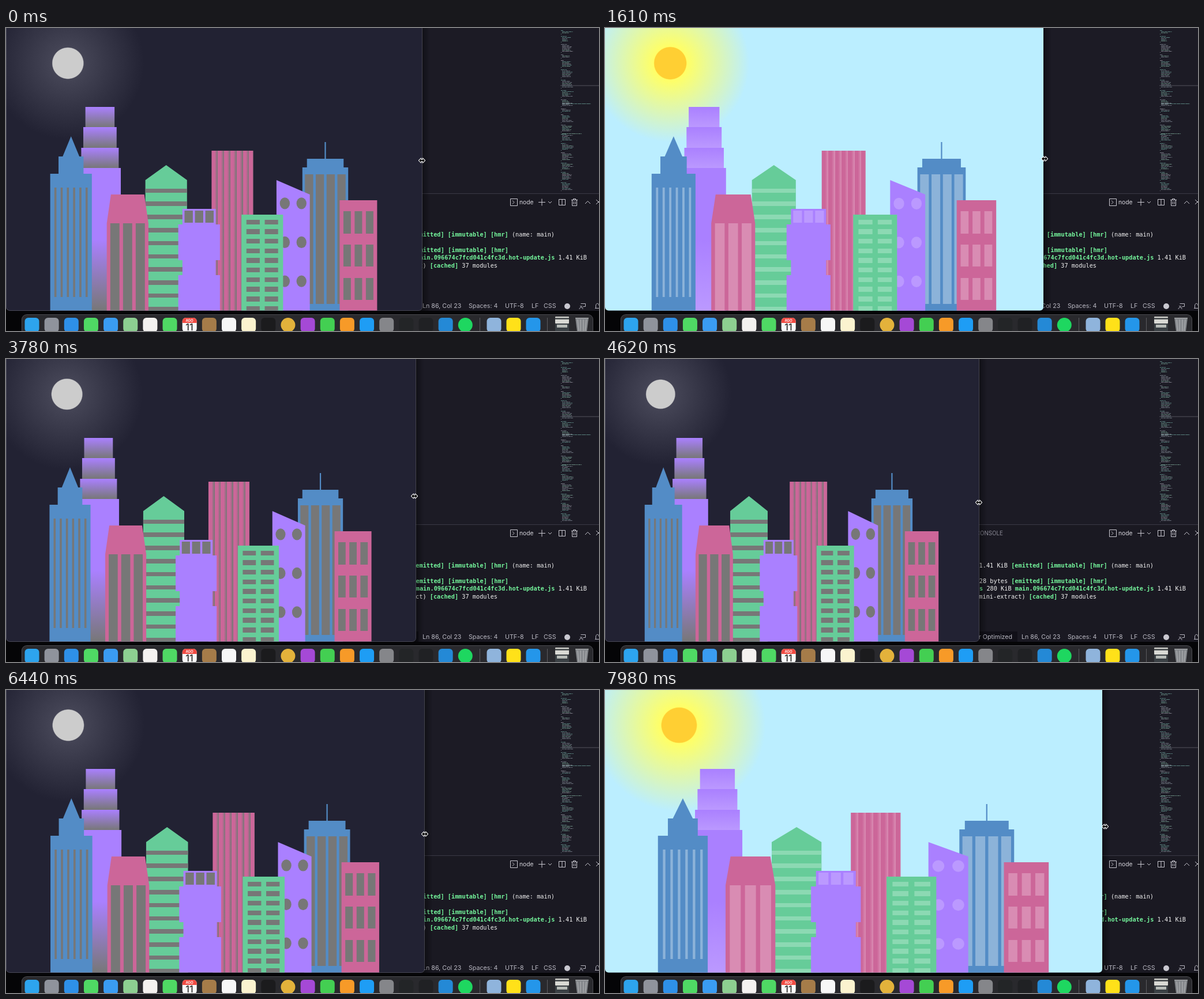
An HTML page with a canvas that plays this animation: 1028x526 px, repeating every 8 s.

```html
<!DOCTYPE html>
<html lang="en">
<head>
<meta charset="utf-8">
<title>Resizing skyline</title>
<style>
  html, body { margin: 0; width: 100%; height: 100%; overflow: hidden; background: #000; }
  #stage { position: relative; width: 1028px; height: 526px; overflow: hidden; }
  canvas { position: absolute; left: 0; top: 0; }
  #stage span { position: absolute; white-space: pre; line-height: 14px; }
  .ui { font: 10.7px Inter, "Open Sans", sans-serif; color: #b9b8c2; }
  .term { font: 10.25px "DejaVu Sans Mono", "Liberation Mono", monospace; color: #f2f2f2; }
  .term b { color: #74f59c; }
  .cal { font: 600 6px Inter, sans-serif; color: #fff; width: 26px; text-align: center; }
  .day { font: 500 16px Inter, sans-serif; color: #2a2a2a; width: 26px; text-align: center; }
</style>
</head>
<body>
<div id="stage">
  <canvas id="desk" width="1028" height="526"></canvas>
  <span class="ui" style="right:338px;top:296px;font-size:9.8px;color:#8b8a96">DEBUG CONSOLE</span>
  <span class="ui" style="left:890px;top:295px;color:#d4d3da;font-size:10.3px">node</span>
  <span class="term" style="right:77px;top:351px"><b>main.096674c7fcd041c4fc3d.hot-update.js</b> 1.41 KiB <b>[emitted]</b> <b>[immutable]</b> <b>[hmr]</b> (name: main)</span>
  <span class="term" style="right:157px;top:378px">28 bytes <b>[emitted]</b> <b>[immutable]</b> <b>[hmr]</b></span>
  <span class="term" style="right:21px;top:391px"><b>main.js</b> 280 KiB <b>main.096674c7fcd041c4fc3d.hot-update.js</b> 1.41 KiB</span>
  <span class="term" style="right:176px;top:405px">(css/mini-extract) <b>[cached]</b> 37 modules</span>
  <span class="ui" style="right:322px;top:476px">Screen Reader Optimized</span>
  <span class="ui" style="left:722px;top:476px">Ln 86, Col 23</span>
  <span class="ui" style="left:802px;top:476px">Spaces: 4</span>
  <span class="ui" style="left:865px;top:476px">UTF-8</span>
  <span class="ui" style="left:911px;top:476px">LF</span>
  <span class="ui" style="left:932px;top:476px">CSS</span>
  <span class="cal" style="left:305px;top:504px;line-height:8px">AGO</span>
  <span class="day" style="left:305px;top:511px;line-height:16px">11</span>
  <canvas id="view" width="1028" height="526"></canvas>
</div>
<script>
const LOOP = 8000, STEP = 70, BREAK = 733, BOTTOM = 491.2, VH = 5.06;
const WALLS = ['#aa80ff', '#66cc99', '#cc6699', '#538cc6'];
const DAY_GLASS = ['#bb99ff', '#8cd9b3', '#d98cb3', '#8cb3d9'];
const NIGHT_GLASS = Array(4).fill('#777');

// time, window width, pointer lead, pointer y
const KEYS = [
  [0, 721, 0, 230], [910, 741, 2, 230], [2590, 777, 1, 223], [3780, 710, -2, 238],
  [4620, 648, 0, 249], [6440, 725, 1, 250], [7980, 862, 5, 237]
];

const context = id => document.getElementById(id).getContext('2d');

// Monotone cubic interpolation of one column of KEYS
function track(t, col) {
  const n = KEYS.length;
  const rise = i => (KEYS[i + 1][col] - KEYS[i][col]) / (KEYS[i + 1][0] - KEYS[i][0]);
  const slope = i => {
    if (i === 0) return rise(0);
    if (i === n - 1) return rise(n - 2);
    const a = rise(i - 1), b = rise(i);
    return a * b <= 0 ? 0 : 2 * a * b / (a + b);
  };
  let i = 0;
  while (i < n - 2 && t >= KEYS[i + 1][0]) i++;
  const h = KEYS[i + 1][0] - KEYS[i][0], u = (t - KEYS[i][0]) / h, v = 1 - u;
  return KEYS[i][col] * (1 + 2 * u) * v * v + KEYS[i + 1][col] * u * u * (3 - 2 * u)
    + h * (slope(i) * u * v * v - slope(i + 1) * u * u * v);
}

function round(g, x, y, w, h, r, fill) {
  g.beginPath();
  g.roundRect(x, y, w, h, r);
  g.fillStyle = fill;
  g.fill();
}

function strokes(g, color, paths) {
  g.strokeStyle = color;
  g.lineWidth = 1;
  g.stroke(new Path2D(paths));
}

function drawMinimap(g) {
  let seed = 11;
  const rand = () => (seed = seed * 16807 % 2147483647) / 2147483647;
  const tints = ['#747b86', '#5f8a86', '#6f9488', '#858591'];
  const line = (x, y, w) => {
    g.fillStyle = tints[Math.floor(rand() * 4)];
    for (let end = x + w; x < end;) {
      const word = Math.min(2 + rand() * 6, end - x);
      g.fillRect(x, y, word, 1);
      x += word + 0.8;
    }
  };
  g.globalAlpha = 0.9;
  for (let y = 4; y < 282; y += 4) {
    line(962, y, 4 + rand() * 7);
    for (let k = 2 + Math.floor(rand() * 5); k > 0 && y < 280; k--) {
      y += 2;
      line(964, y, 9 + rand() * 11);
    }
    y += 2;
    g.fillRect(962, y, 1, 1);
  }
  line(964, 131, 50);
  line(964, 183, 34);
  g.globalAlpha = 1;
  g.fillStyle = '#55545f';
  g.fillRect(961, 99.5, 67, 1);
}

function drawDock(g) {
  round(g, 27, 497, 991, 50, 9, '#4b4b50');
  round(g, 28, 498, 989, 50, 8, '#29292d');
  const apps = ['#2da4ee', '#8f939c', '#2e90e8', '#4fd964', '#3a9cf2', '#8dcf91', '#f4f2f0',
    '#4fd964', '#fafafa', '#a67c49', '#f7f7f7', '#fbf3cf', '#1b1b1d', '#e3b23b', '#a549d6',
    '#43cf52', '#f79a28', '#1e9df5', '#85868a', '#232527', '#202124', '#2489d6', '#1ed760'];
  const app = (x, color, disc) => round(g, x - 12.5, 503, 25, 25, disc ? 12.5 : 6, color);
  apps.forEach((color, i) => app(45 + i * 34.15, color, i === 13 || i === 22));
  app(846, '#8fb4dc');
  app(880, '#ffe119');
  app(914, '#2496ea');
  // calendar header
  g.save();
  g.beginPath();
  g.roundRect(305.7, 503, 25, 25, 6);
  g.clip();
  g.fillStyle = '#f04a42';
  g.fillRect(305, 503, 27, 9);
  g.restore();
  g.fillStyle = '#5a5a5f';
  g.fillRect(821, 503, 1, 23);
  g.fillRect(938, 503, 1, 23);
  // stack of files and bin
  round(g, 952, 501, 24, 12, 1, '#d9d9d4');
  round(g, 952, 503, 24, 3, 0, '#54585a');
  round(g, 952, 513, 24, 14, 1, '#3b4145');
  round(g, 955, 515, 18, 5, 0, '#b8bcb8');
  g.fillStyle = '#85888c';
  g.fill(new Path2D('M987 503H1010L1007 526H990Z'));
  strokes(g, '#b4b6b8', 'M987 503.5H1010M991 506L993 526M996 506V526M1001 506V526M1006 506L1004 526');
}

function drawDesk() {
  const g = context('desk');
  g.fillStyle = '#050507';
  g.fillRect(0, 0, 1028, 526);
  g.fillStyle = '#1c1b25';
  g.fillRect(0, 0, 1028, 288);
  g.fillStyle = '#1a1922';
  g.fillRect(0, 288, 1028, 203);
  g.fillStyle = '#3b3a46';
  g.fillRect(0, 287, 1028, 1);
  g.fillStyle = '#111018';
  g.fillRect(560, 473, 155, 18);
  drawMinimap(g);
  strokes(g, '#c9c8d0',
    'M874.5 296.5H886.5V308.5H874.5ZM878 299.5L881 302.5L878 305.5' +
    'M923 302.5H935M929 296.5V308.5M940 301L943 304L946 301' +
    'M958.5 297.5H969.5V307.5H958.5ZM964 297V308' +
    'M980 298.5H991M983.5 298V296.5H987.5V298M981.5 299V308.5H989.5V299M984 301V306M987 301V306' +
    'M1004 305L1008.5 300.5L1013 305M1023 298L1031 306M1023 306L1031 298');
  g.fillStyle = '#c9c8d0';
  g.beginPath();
  g.arc(973, 483, 5, 0, 7);
  g.fill();
  strokes(g, '#b9b8c2',
    'M996.5 478.5H1004.5V483.5H1001L999 485.5M994 488C994 484 1000 484 1000 488M995.5 482A1.5 1.5 0 1 0 998.5 482' +
    'M1021 486.5H1029M1022.5 486V482C1022.5 477 1028 477 1028 482');
  drawDock(g);
}

function drawCity(g, w, night) {
  const X = p => p * w / 100 - 1, Y = p => BOTTOM - p * VH;
  const glass = night ? NIGHT_GLASS : DAY_GLASS;
  // left, top above ground, width, height: all in percent of the page
  const box = (x, top, wd, ht, fill) => {
    const y = Math.round(Y(top));
    g.fillStyle = fill;
    g.fillRect(X(x), y, wd * w / 100, Math.round(Y(top - ht)) - y);
  };
  const poly = (fill, ...pts) => {
    g.beginPath();
    pts.forEach(([x, y]) => g.lineTo(X(x), Math.round(Y(y))));
    g.fillStyle = fill;
    g.fill();
  };
  const fade = (top, ht, start) => {
    const f = g.createLinearGradient(0, Y(top), 0, Y(top - ht));
    f.addColorStop(start, WALLS[0]);
    f.addColorStop(1, glass[0]);
    return f;
  };
  const repeat = (n, fn) => { for (let i = 0; i < n; i++) fn(i); };

  const sky = g.createRadialGradient(X(15), Y(85), 0, X(15), Y(85), Math.hypot(w * 0.15, 15 * VH));
  const [disc, halo, air] = night ? ['#ccc', '#445', '#223'] : ['#ffcf33', '#ffff66', '#bbeeff'];
  sky.addColorStop(0, disc);
  sky.addColorStop(0.2, disc);
  sky.addColorStop(0.21, halo);
  sky.addColorStop(1, air);
  g.fillStyle = sky;
  g.fillRect(0, 0, w, BOTTOM);

  // back row: stepped tower
  repeat(3, i => {
    const wd = 7 + i, top = 70 - 7 * i;
    box(22.7 - wd / 2, top, wd, 7, fade(top, 7, 0));
  });
  box(17.7, 49, 10, 49, fade(49, 49, 0.5));

  // banded block with gable
  poly(WALLS[1], [33.6, 45], [38.6, 50], [43.6, 45]);
  box(33.6, 45, 10, 45, WALLS[1]);
  for (let p = 42; p > 0; p -= 4.5) box(33.6, p, 10, Math.min(1.5, p), glass[1]);

  // fluted block
  const flutes = g.createLinearGradient(X(49.5), 0, X(60), 0);
  repeat(7, i => {
    flutes.addColorStop(i / 7, WALLS[2]);
    flutes.addColorStop((i + 0.5) / 7, WALLS[2]);
    flutes.addColorStop((i + 1) / 7, glass[2]);
  });
  box(49.5, 55, 10, 55, flutes);

  // tower with antenna
  box(76.8 - 110 / w, 58, 220 / w, 5.8, WALLS[3]);
  box(72.4, 52.2, 8.8, 2.9, WALLS[3]);
  box(71.3, 49.3, 11, 49.3, WALLS[3]);
  repeat(4, i => box(71.916 + 2.596 * i, 46.835, 1.98, 44.37, glass[3]));

  // front row: spire
  poly(WALLS[3], [13.75, 53], [15.75, 60], [17.75, 53]);
  box(12.75, 53, 6, 6, WALLS[3]);
  box(10.75, 47, 10, 47, WALLS[3]);
  repeat(6, i => box(11.75 + 1.5 * i, 42.3, 0.5, 37.6, glass[3]));

  // tapered roof
  poly(WALLS[2], [24.333, 30], [25.333, 40], [33.333, 40], [34.333, 30]);
  box(24.333, 30, 10, 30, WALLS[2]);
  repeat(3, i => box(25.183 + 3.05 * i, 30, 2.2, 30, glass[2]));

  // notched block
  box(42.5, 35, 8, 5.25, WALLS[0]);
  repeat(3, i => box(43 + 2.5 * i, 34.475, 2, 4.2, glass[0]));
  box(41.5, 29.75, 10, 12.25, WALLS[0]);
  box(42.5, 17.5, 8, 5.25, WALLS[0]);
  box(41.5, 12.25, 10, 12.25, WALLS[0]);

  // red grid block
  box(80.25, 38, 9, 38, WALLS[2]);
  repeat(9, i => box(81.15 + 2.7 * (i % 3), 34.2 - 11.4 * Math.floor(i / 3), 1.8, 7.6, glass[2]));

  // slanted block with round windows
  poly(WALLS[0], [65.083, 45], [73.083, 40], [73.083, 0], [65.083, 0]);
  repeat(6, i => {
    g.beginPath();
    g.ellipse(X(67.083 + 4 * (i % 2)), Y(38.05 - 13.35 * Math.floor(i / 2)) + w * 0.008,
      w * 0.012, 2 * VH, 0, 0, 7);
    g.fillStyle = glass[0];
    g.fill();
  });

  // green grid block
  box(56.667, 33, 10, 33, WALLS[1]);
  repeat(20, i => box(57.867 + 4.4 * (i % 2), 31.35 - 3.3 * Math.floor(i / 2), 3.2, 1.65, glass[1]));
}

function drawPointer(g, x, y) {
  const p = new Path2D('M-5 0L-1.5 -3.5V-1H1.5V-3.5L5 0L1.5 3.5V1H-1.5V3.5Z');
  g.save();
  g.translate(x, y);
  g.lineJoin = 'round';
  g.strokeStyle = '#fff';
  g.lineWidth = 2;
  g.stroke(p);
  g.fillStyle = '#000';
  g.fill(p);
  g.restore();
}

const view = context('view');

function draw(t) {
  const g = view, edge = Math.round(track(t, 1)), night = edge < BREAK;
  const frame = x => {
    g.beginPath();
    g.roundRect(x, -20, edge, 510.5, 6);
  };
  g.clearRect(0, 0, 1028, 526);

  const shade = g.createLinearGradient(edge, 0, edge + 14, 0);
  shade.addColorStop(0, 'rgba(0,0,0,.4)');
  shade.addColorStop(1, 'rgba(0,0,0,0)');
  g.fillStyle = shade;
  g.fillRect(edge - 6, 0, 20, 491);
  g.fillStyle = '#050507';
  g.fillRect(0, 484, 6, 8);

  g.save();
  frame(0);
  g.clip();
  drawCity(g, edge + 1, night);
  g.restore();

  if (night) {
    frame(0.5);
    g.strokeStyle = 'rgba(130,130,145,.45)';
    g.lineWidth = 1;
    g.stroke();
  }
  drawPointer(g, edge + Math.round(track(t, 2)), Math.round(track(t, 3)));
}

function tick() {
  const t = performance.now() % LOOP;
  draw(Math.floor(t / STEP) * STEP);
  requestAnimationFrame(tick);
}

drawDesk();
tick();
</script>
</body>
</html>
```
